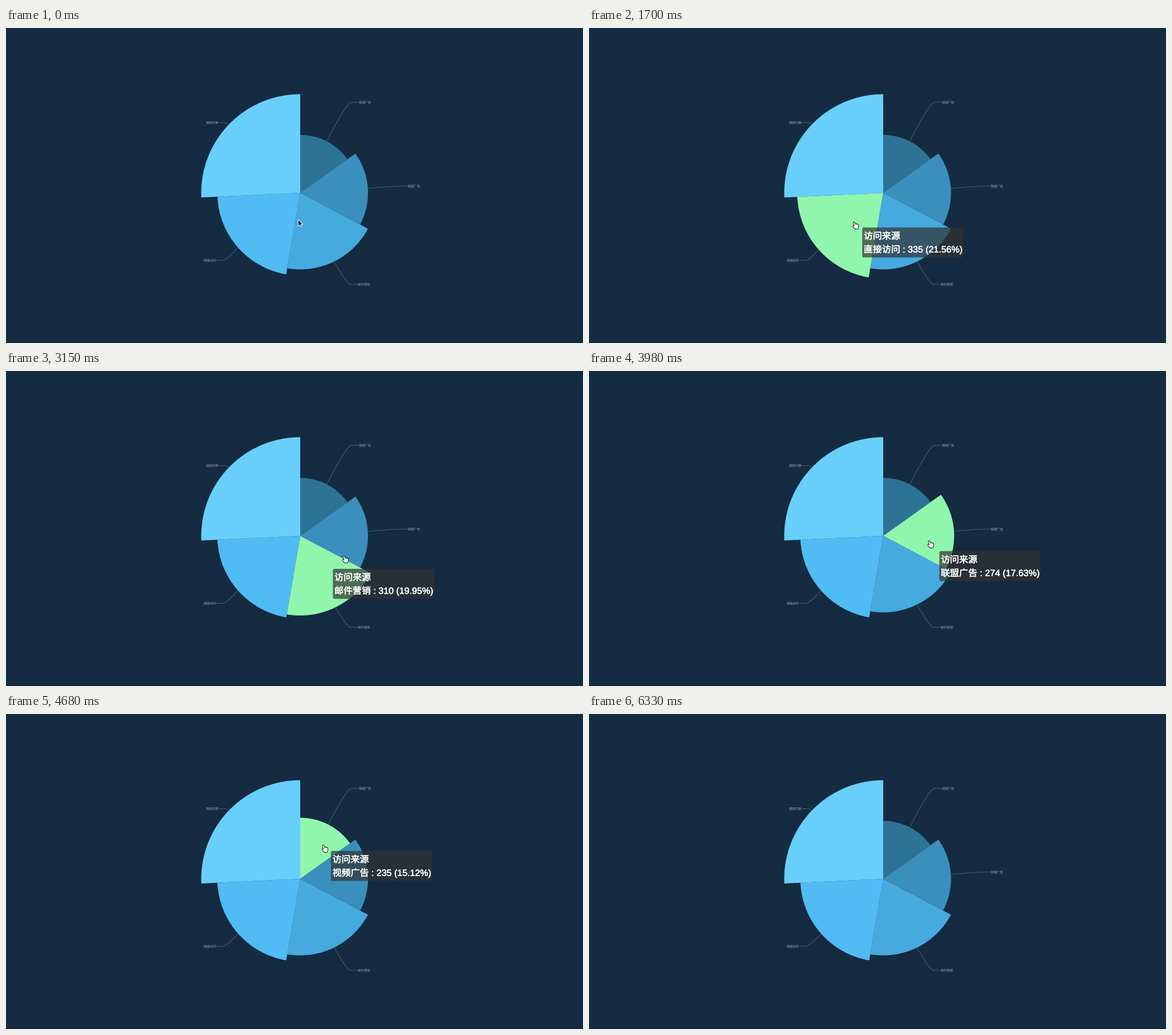
These frames come from a looping animation (1012 by 554 pixels, 6.84 s). A matplotlib script:

```python
import numpy as np
import matplotlib.pyplot as plt
from matplotlib.animation import FuncAnimation
from matplotlib.patches import FancyBboxPatch, PathPatch, Polygon, Rectangle, Wedge
from matplotlib.path import Path
from matplotlib.patheffects import withStroke

W, H = 1012, 554
LOOP, TICK = 6840, 20
CX, CY, R_MAX, LIFT = 516, 290, 173.6, 5.5
BG, GREY, GREEN = "#142b41", "#5a6b7a", "#91f6ad"
FONTS = ["Liberation Sans", "Noto Sans CJK JP"]

# name, value, colour, label x
SLICES = [
    ("视频广告", 235, "#2d7396", 619),
    ("联盟广告", 274, "#3b8fbc", 705),
    ("邮件营销", 310, "#46aadf", 617),
    ("直接访问", 335, "#51bbf4", 368),
    ("搜索引擎", 400, "#68cffb", 372),
]
VALUES = np.array([s[1] for s in SLICES])
TOTAL = VALUES.sum()
RADII = R_MAX * VALUES / VALUES.max()
EDGES = np.append(0, np.cumsum(360 * VALUES / TOTAL))
MIDS = np.radians((EDGES[:-1] + EDGES[1:]) / 2)

# the picture only refreshes in bursts: first time, last time, refreshes
BURSTS = [(0, 0, 1), (660, 860, 2), (1190, 1700, 7), (2270, 2950, 9), (3070, 3680, 8),
          (3980, 4590, 8), (4680, 4680, 1), (5880, 5880, 1), (5940, 6330, 5)]
STEPS = np.concatenate([np.linspace(a, b, n) // 10 * 10 for a, b, n in BURSTS])

# glides of the cursor: start, end, x, y
START = (512.5, 337)
GLIDES = [(660, 660, 499.5, 343.5), (860, 860, 479.5, 340.5),
          (1100, 1360, 462.5, 340.5), (2190, 2860, 559, 337.7),
          (3060, 3150, 590, 324.5), (3150, 3330, 599, 306.5),
          (3910, 4250, 554, 230), (5800, 5880, 577, 235), (5880, 6130, 730, 345)]
AWAKE, CURSOR_OFF, TIP_OFF = 1190, 6230, 6330
LAG, TIP_TAU, LIFT_TAU = 90, 100, 30
TIP_START, TIP_SHIFT = (636, 366), (15.5, 10.2)

ARROW = np.array([(0, 0), (0, 11.2), (2.6, 8.8), (4.2, 12.6), (6, 11.8),
                  (4.4, 8.2), (8, 8.2)])
FINGERS = [(1.6, 8.2), (2.4, 2), (5.8, 5.4), (7.7, 5.7), (9.3, 6.5)]


def cursor(t):
    pos = np.array(START)
    for a, b, x, y in GLIDES:
        p = np.clip((t - a + 1) / (b - a + 1), 0, 1)
        pos = pos + (np.array([x, y]) - pos) * p * p * (3 - 2 * p)
    return pos


def hit(pos):
    """Index of the slice under the fingertip, or None."""
    dx, dy = pos + (3, 1) - (CX, CY)
    angle = np.degrees(np.arctan2(dx, -dy)) % 360
    i = np.searchsorted(EDGES, angle, side="right") - 1
    return i if np.hypot(dx, dy) < RADII[i] + LIFT else None


def simulate(dt=10):
    """The page reacts late to the cursor; tooltip and slices ease after it."""
    tip, lifts, hot, last, states = np.array(TIP_START, float), np.zeros(5), None, 3, {}
    for t in range(0, LOOP, dt):
        if t >= AWAKE:
            late = cursor(t - LAG)
            hot = hit(late) if t < CURSOR_OFF else None
            last = last if hot is None else hot
            tip = tip + (late + TIP_SHIFT - tip) * (1 - np.exp(-dt / TIP_TAU))
            goal = np.arange(5) == hot
            lifts = lifts + (goal - lifts) * (1 - np.exp(-dt / LIFT_TAU))
        states[t] = (hot, last, tip, lifts)
    return states


def leader(i, radius):
    """Smoothed line from the rim of a slice, round an elbow, to its label."""
    side = 1 if MIDS[i] < np.pi else -1
    out = np.array([np.sin(MIDS[i]), -np.cos(MIDS[i])])
    rim = np.array([CX, CY]) + out * radius
    end = np.array([SLICES[i][3] - side, CY + out[1] * (R_MAX + LIFT)])
    elbow = end - (side * 12, 0)
    d0, d1 = np.hypot(*(elbow - rim)), 12
    bend = np.array([.2 * (end - rim)[0] / (d0 + d1), 0])
    return Path([rim, rim, elbow - bend * d0, elbow, elbow + bend * d1, end, end],
                [Path.MOVETO] + [Path.CURVE4] * 6)


def write(x, y, text, size, color, bold, **kw):
    return ax.text(x, y, text, fontsize=size, color=color, family=FONTS,
                   path_effects=[withStroke(linewidth=bold, foreground=color)], **kw)


fig = plt.figure(figsize=(W / 72, H / 72), dpi=72, facecolor=BG)
ax = fig.add_axes([0, 0, 1, 1])
ax.set(xlim=(0, W), ylim=(H, 0))
ax.axis("off")
ax.add_patch(Rectangle((0, H - 2), W, 2, fc="#12263a", lw=0))

wedges, lines = [], []
for i, (name, _, color, x) in enumerate(SLICES):
    wedges.append(ax.add_patch(Wedge((CX, CY), RADII[i], EDGES[i] - 90,
                                     EDGES[i + 1] - 90, fc=color, lw=0, zorder=2)))
    lines.append(ax.add_patch(PathPatch(leader(i, RADII[i]), fc="none",
                                        ec=GREY, lw=.8, zorder=3)))
    y = CY - np.cos(MIDS[i]) * (R_MAX + LIFT)
    write(x, y + 2.1, name, 5.3, GREY, .25, zorder=3, ha="left" if x > CX else "right")

box = ax.add_patch(FancyBboxPatch((0, 0), 1, 1, fc=(.196, .196, .196, .7), lw=0,
                                  boxstyle="round,pad=0,rounding_size=2.5", zorder=5))
title = write(0, 0, "访问来源", 16, "white", .5, zorder=6)
detail = write(0, 0, "", 16, "white", .5, zorder=6)
arrow = ax.add_patch(Polygon(ARROW, fc="black", ec="white", lw=.9, zorder=8))
hand = [ax.plot([], [], color=c, lw=w, solid_capstyle="round",
                solid_joinstyle="round", zorder=z)[0]
        for c, w, z in [("black", 3.8, 8), ("white", 2, 9)]]


def draw_pie(hot, lifts):
    for i, wedge in enumerate(wedges):
        radius = RADII[i] + LIFT * lifts[i]
        wedge.set_radius(radius)
        wedge.set_facecolor(GREEN if i == hot else SLICES[i][2])
        lines[i].set_path(leader(i, radius))


def draw_tip(t, last, tip):
    for part in (box, title, detail):
        part.set_visible(AWAKE <= t < TIP_OFF)
    x, y = tip
    name, value = SLICES[last][:2]
    box.set_bounds(x, y, 177.5, 52.7)
    title.set_position((x + 2.6, y + 20.3))
    detail.set_position((x + 2.6, y + 44))
    detail.set_text(f"{name} : {value} ({value / TOTAL:.2%})")


def draw_cursor(t, pointing):
    pos = cursor(t)
    arrow.set_visible(not pointing and t < CURSOR_OFF)
    arrow.set_xy(ARROW + pos)
    # each finger is a stroke running down to the wrist
    strokes = np.array([p for k, tip in enumerate(FINGERS)
                        for p in (tip, (5 + .8 * k, 11.8), (np.nan, np.nan))]) + pos
    for line in hand:
        line.set_visible(pointing)
        line.set_data(strokes.T)


STATES = simulate()


def update(i):
    now = i * TICK + TICK / 2
    t = int(STEPS[STEPS <= now].max())
    hot, last, tip, lifts = STATES[t]
    draw_pie(hot, lifts)
    draw_tip(t, last, tip)
    draw_cursor(t, hot is not None)
    return []


anim = FuncAnimation(fig, update, frames=LOOP // TICK, interval=TICK,
                     repeat=True, repeat_delay=0, blit=False)
plt.show()
```
